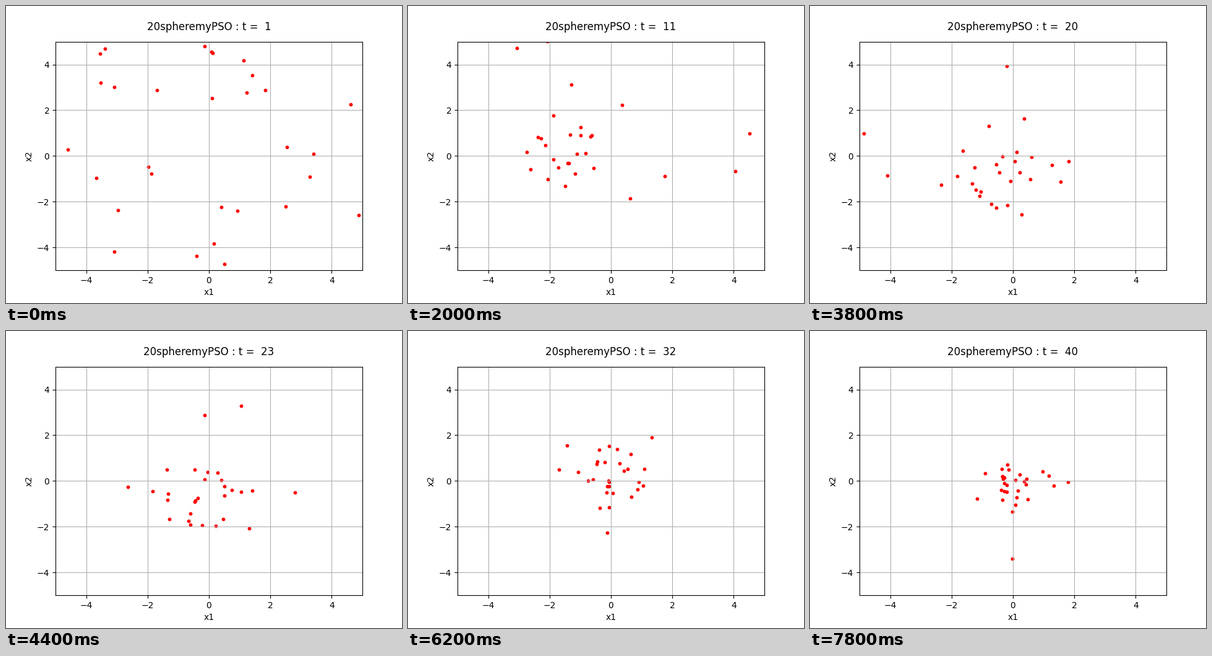
Write a matplotlib script that moves like this. It is 640 px wide and 480 px high and loops after 8 s.

```python
import numpy as np
import matplotlib.pyplot as plt
from matplotlib.animation import FuncAnimation

STEPS, SWARM, LIMIT = 40, 30, 5

# Key points of the search: step, swarm centre, spread, two far-flung particles
KEYS = np.array([
    (1, -0.8, -0.8, 2.5, 2.3, 4.87, -2.60, 0.08, 4.56),
    (7, -3.3, 1.3, 0.7, 0.8, 3.92, 2.44, -4.29, -3.00),
    (15, -0.5, -0.3, 1.6, 1.3, 4.18, -3.75, -0.28, 4.56),
    (20, -0.3, -0.6, 0.9, 0.8, -4.86, 0.98, -0.21, 3.93),
    (27, -0.1, -0.4, 0.6, 0.5, 3.27, -0.15, 2.73, 2.40),
    (32, -0.1, 0.2, 0.5, 0.6, 1.33, 1.90, -0.12, -2.25),
    (40, -0.1, -0.2, 0.4, 0.4, 1.79, -0.05, -0.03, -3.40),
])

fig, ax = plt.subplots(figsize=(6.4, 4.8), dpi=100)
ax.set(xlim=(-LIMIT, LIMIT), ylim=(-LIMIT, LIMIT), xlabel="x1", ylabel="x2")
ax.grid(True)
title = ax.set_title("", pad=13.5)
dots = ax.scatter([], [], s=10, c="red")


def swarm_at(t):
    rng = np.random.default_rng(t)
    tracks = [np.interp(t, KEYS[:, 0], col) for col in KEYS[:, 1:].T]
    centre, spread, *strays = np.reshape(tracks, (-1, 2))
    size = (SWARM - len(strays), 2)
    if t == 1:  # the search starts from an even scatter
        cloud = rng.uniform(-LIMIT, LIMIT, size)
    else:  # heavy tails: a tight core with a few particles far out
        cloud = centre + spread * rng.standard_t(4, size)
    return np.vstack([cloud, strays])


def update(i):
    t = i + 1
    dots.set_offsets(swarm_at(t))
    title.set_text(f"20spheremyPSO : t =  {t}")
    return dots, title


anim = FuncAnimation(fig, update, frames=STEPS, interval=200, repeat=True)
plt.show()
```
